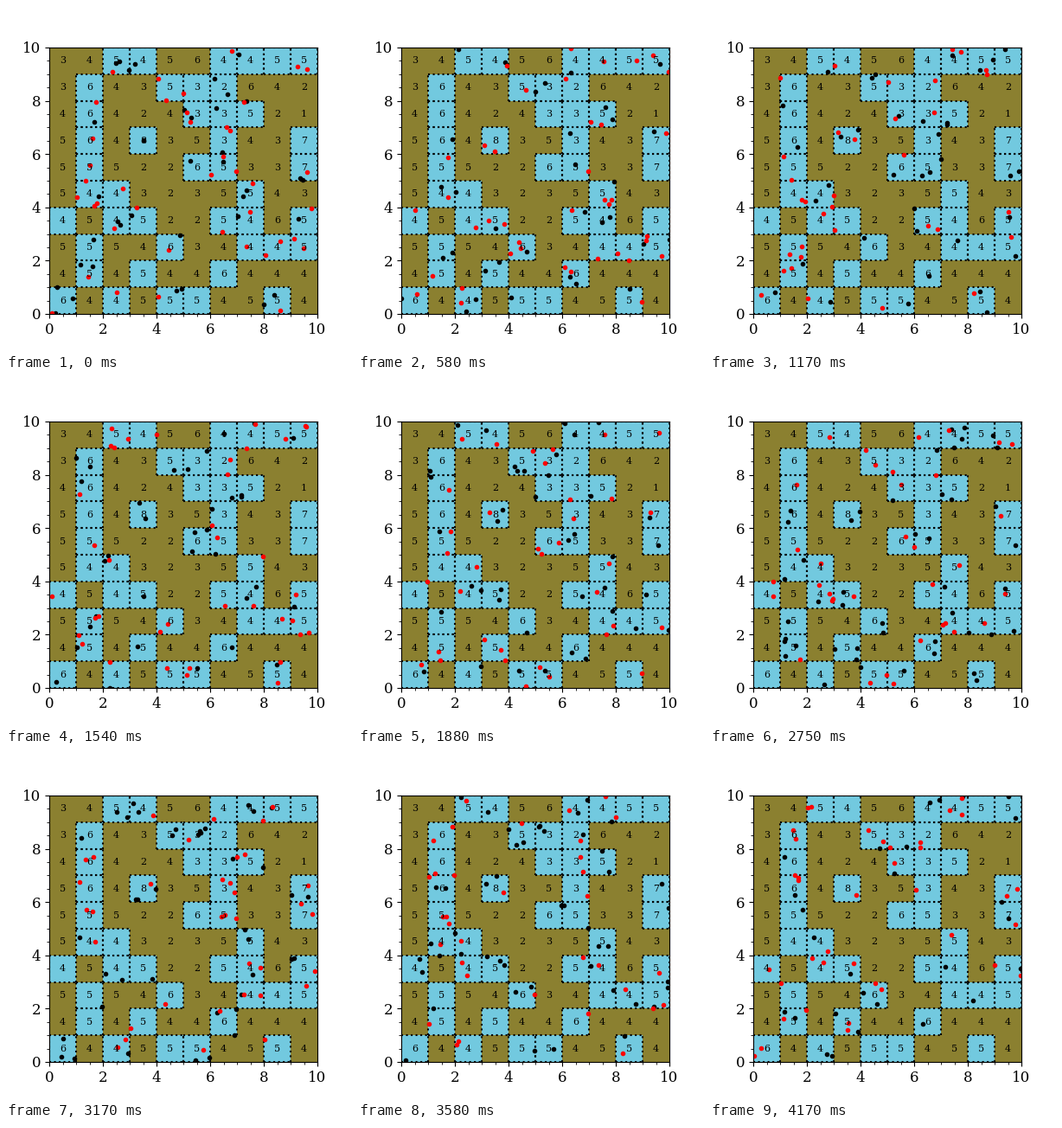
Recreate the animation shown at these times as a matplotlib script. Size 400x400 px, loop 4.21 s.

```python
import matplotlib.pyplot as plt
import numpy as np
from matplotlib.animation import FuncAnimation
from matplotlib.patches import Rectangle

LOOP_MS = 4210
FRAMES = 101
SIZE = 10
POINTS = 84

LAND = "#8b8030"
WATER = "#72c9df"

# top row first
GRID = """
..##..####
.#..###...
.#...###..
.#.#..#..#
.#...##..#
.##....#..
#.##..##.#
.#..#..###
.#.#..#...
#.#.##..#.
"""

water = np.array([[c == "#" for c in row] for row in GRID.split()])[::-1]


def unlike_neighbours(cells):
    """Count the eight wrapped neighbours of the other kind."""
    shifts = [(i, j) for i in (-1, 0, 1) for j in (-1, 0, 1) if i or j]
    return sum((np.roll(cells, s, (0, 1)) != cells).astype(int) for s in shifts)


plt.rcParams.update({
    "font.family": "DejaVu Serif",
    "font.size": 12,
    "xtick.minor.visible": True,
    "ytick.minor.visible": True,
})

fig, ax = plt.subplots(figsize=(4, 4), dpi=100)
ax.set(xlim=(0, SIZE), ylim=(0, SIZE), facecolor=LAND)
ax.set_xticks(range(0, SIZE + 1, 2))
ax.set_yticks(range(0, SIZE + 1, 2))


def draw_pool(x, y):
    """Fill a cell; each side is dotted afresh from its lower or left end."""
    ax.add_patch(Rectangle((x, y), 1, 1, facecolor=WATER, linewidth=0))
    for d in (0, 1):
        ax.plot([x, x + 1], [y + d, y + d], "k:", linewidth=1.5)
        ax.plot([x + d, x + d], [y, y + 1], "k:", linewidth=1.5)


counts = unlike_neighbours(water)
for y, x in np.ndindex(water.shape):
    if water[y, x]:
        draw_pool(x, y)
    ax.text(x + 0.5, y + 0.5, str(counts[y, x]), size=8,
            ha="center", va="center")


def make_dots(color):
    return ax.plot([], [], "o", color=color, markersize=3)[0]


dots = [make_dots("black"), make_dots("red")]


def scatter(rng):
    """Uniform points, keeping those that land on water."""
    x, y = rng.uniform(0, SIZE, (2, POINTS))
    keep = water[y.astype(int), x.astype(int)]
    return x[keep], y[keep]


def update(frame):
    rng = np.random.default_rng(700 + frame)
    for line in dots:
        line.set_data(*scatter(rng))
    return dots


anim = FuncAnimation(fig, update, frames=FRAMES, interval=LOOP_MS / FRAMES,
                     init_func=lambda: update(0), repeat=True, repeat_delay=0)
plt.show()
```
